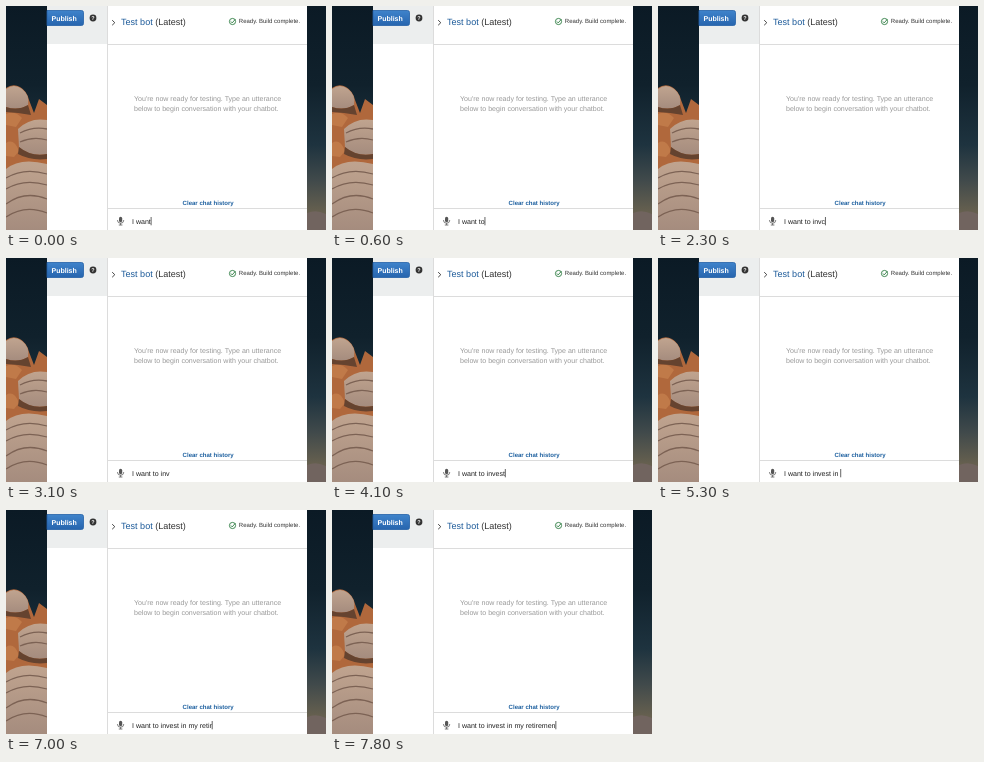
These frames come from a looping animation (320x224 px, 8000 ms). An HTML page:

```html
<!DOCTYPE html>
<html lang="en">
<head>
<meta charset="utf-8">
<title>Chatbot test window</title>
<style>
  html, body { margin: 0; width: 100%; height: 100%; overflow: hidden; background: #fff; }
  svg { display: block; width: 320px; height: 224px; }
  text { font-family: "Liberation Sans", Arial, sans-serif; text-rendering: geometricPrecision; white-space: pre; }
  .bold { font-weight: bold; }
</style>
</head>
<body>
<svg viewBox="0 0 320 224">
  <defs>
    <linearGradient id="sky" x2="0" y2="1">
      <stop stop-color="#0b1a25"/>
      <stop offset=".35" stop-color="#10212c"/>
      <stop offset=".62" stop-color="#1e333f"/>
      <stop offset=".78" stop-color="#414a4b"/>
      <stop offset=".92" stop-color="#66604f"/>
    </linearGradient>
    <linearGradient id="rock" x2="0" y2="1">
      <stop stop-color="#c0a48f"/>
      <stop offset="1" stop-color="#a58c7e"/>
    </linearGradient>
    <linearGradient id="button" x2="0" y2="1">
      <stop stop-color="#3f83cb"/>
      <stop offset="1" stop-color="#2765ae"/>
    </linearGradient>
  </defs>

  <!-- desktop -->
  <rect width="320" height="224" fill="url(#sky)"/>
  <path d="M0 82Q7 77 14 81T23 94L28 107 33 93 41 99V224H0Z" fill="#b0683c"/>
  <g fill="url(#rock)">
    <path d="M0 83Q8 77 16 83T22 99Q12 105 0 101Z"/>
    <path d="M12 123Q24 111 41 114V148Q24 151 13 141Z"/>
    <path d="M0 163Q14 151 41 158V224H0Z"/>
  </g>
  <path d="M0 108Q9 104 16 112L10 121 0 119ZM0 137Q8 132 13 145L8 151 0 150Z" fill="#c07a49"/>
  <path d="M0 101Q12 105 22 99L25 109 12 107 0 106ZM13 141Q25 151 41 148V153Q25 155 12 148Z" fill="#65432f"/>
  <path d="M14 127Q27 120 41 123M14 136Q27 130 41 134M0 172Q18 161 41 168M0 183Q18 172 41 179M0 198Q19 184 41 193M0 211Q19 198 41 207" fill="none" stroke="#7c6254" stroke-width="1.3"/>
  <path d="M301 207Q310 203 320 208V224H301Z" fill="#71645f"/>

  <!-- window -->
  <path d="M41 0H301V224H41Z" fill="#fff"/>
  <path d="M41 0H101V38H41Z" fill="#eceeee"/>
  <path d="M101.5 0V224M101 38.5H301M101 202.5H301" stroke="#dcdcdc" fill="none"/>

  <path d="M41 4.5H75.5Q77.5 4.5 77.5 6.5V17.5Q77.5 19.5 75.5 19.5H41Z" fill="url(#button)" stroke="#2461a8" stroke-width=".8"/>
  <text class="bold" x="45.5" y="14.5" font-size="7" fill="#fff">Publish</text>
  <circle cx="87" cy="12" r="3.4" fill="#333"/>
  <text class="bold" x="87" y="14" font-size="5.5" fill="#fff" text-anchor="middle">?</text>

  <path d="M106.2 14.2L108.8 16.7 106.2 19.2" fill="none" stroke="#444"/>
  <text x="115" y="19" font-size="9.05" fill="#333"><tspan fill="#1c5a99">Test bot</tspan> (Latest)</text>
  <g fill="none" stroke="#2f7d43" stroke-width=".9">
    <circle cx="226.5" cy="15.5" r="3.1"/>
    <path d="M224.8 15.4L226.2 16.9 229.4 13.2"/>
  </g>
  <text x="232.8" y="17.3" font-size="6" fill="#333">Ready. Build complete.</text>

  <g font-size="7.05" fill="#999">
    <text x="128" y="95">You're now ready for testing. Type an utterance</text>
    <text x="128" y="105.4">below to begin conversation with your chatbot.</text>
  </g>
  <text class="bold" x="176.6" y="198.5" font-size="6.05" fill="#1c5f9f">Clear chat history</text>

  <!-- input -->
  <rect x="113" y="210.8" width="3.2" height="5.4" rx="1.6" fill="#555"/>
  <path d="M111.6 214V214.8Q111.8 217.2 114.6 217.2T117.6 214.8V214M114.6 217.2V219M112.8 219H116.4" fill="none" stroke="#555" stroke-width=".8"/>
  <text id="typed" x="126" y="217.5" font-size="7.05" fill="#222"></text>
  <path id="caret" d="M0 211V219.3" stroke="#222" stroke-width=".7"/>
</svg>
<script>
const typed = document.getElementById('typed');
const caret = document.getElementById('caret');
const LOOP = 8000;
const phrase = 'I want to invest in my retiremen';

// When each letter after "I want" appears.
const keyTimes = [
  200, 400, 600, 800, 1000, 1200, 1300,
  3500, 3800, 4000, 4400, 4600, 4800, 5000,
  5500, 5700, 5900, 6100, 6400, 6600, 6800, 7000, 7300, 7500, 7700, 7800
];

function textAt(t) {
  const keys = keyTimes.filter(time => time <= t).length;
  const typo = t >= 1500 && t < 2400 ? 'c' : '';
  return phrase.slice(0, 'I want'.length + keys) + typo;
}

function draw(now) {
  const t = now % LOOP;
  const text = textAt(t);
  if (typed.textContent !== text) typed.textContent = text;
  caret.setAttribute('transform', `translate(${126.3 + typed.getComputedTextLength()})`);
  caret.setAttribute('visibility', t >= 3000 && t < 3500 ? 'hidden' : 'visible');
}

const start = performance.now();
function frame() {
  draw(performance.now() - start);
  requestAnimationFrame(frame);
}
frame();
</script>
</body>
</html>
```
